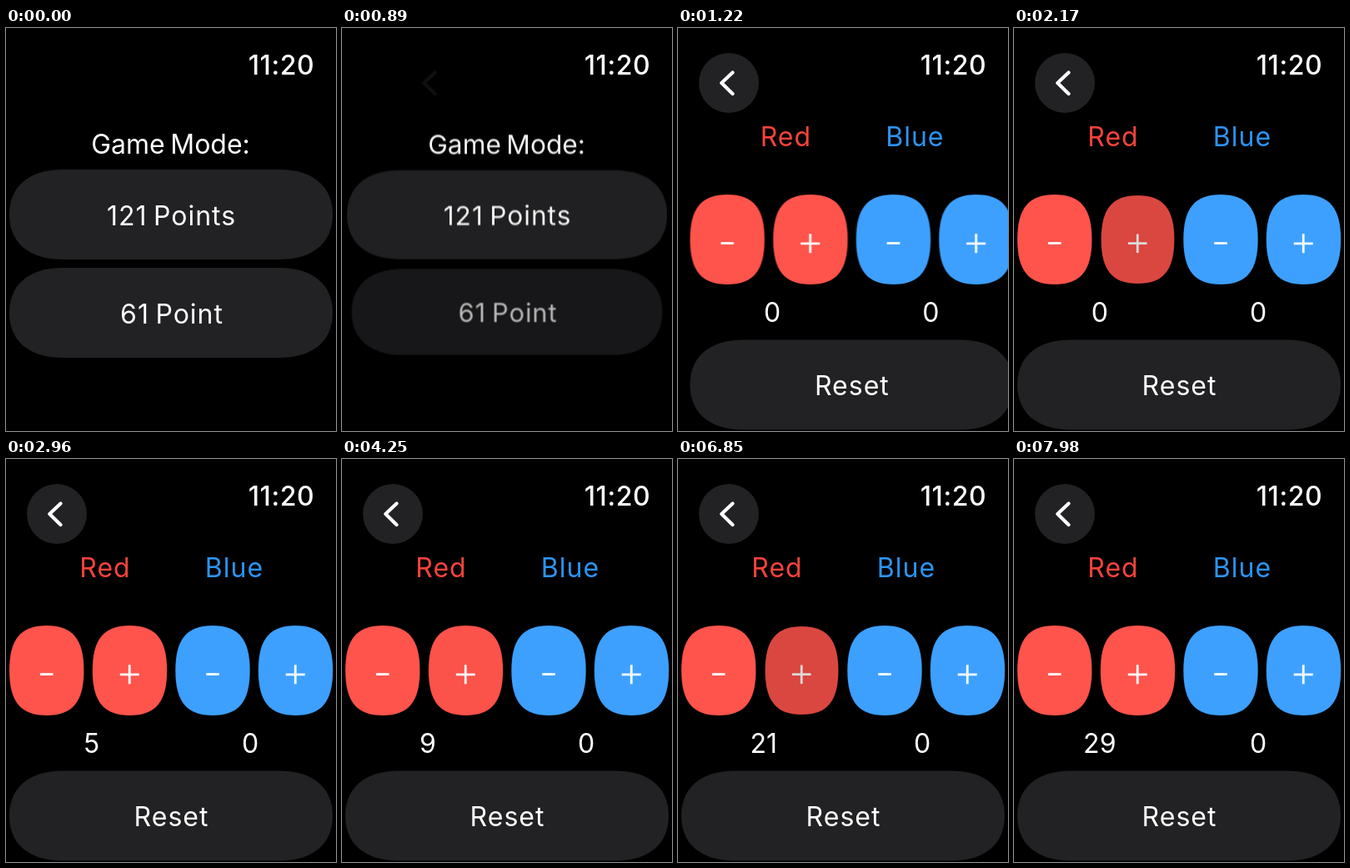
Animation, 396 px wide and 484 px high, one loop 8000 ms. Source, as an HTML page:

```html
<!DOCTYPE html>
<html lang="en">
<head>
<meta charset="utf-8">
<title>Score keeper</title>
<style>
  html, body { margin: 0; width: 100%; height: 100%; overflow: hidden; background: #000; }
  svg { display: block; width: 396px; height: 484px; }
  text {
    font: 400 32px Inter, "Noto Sans", sans-serif;
    fill: #fff;
    text-anchor: middle;
    letter-spacing: 1px;
    word-spacing: -2.5px;
  }
  .tight { letter-spacing: 0; }
  .clock { font-weight: 500; letter-spacing: .6px; }
  .gray { fill: #222224; }
  .red { fill: #ff544c; }
  .blue { fill: #3da0ff; }
  .pad { stroke: #000; stroke-opacity: .12; }
  .sign { fill: none; stroke: #fff; stroke-width: 2.8; }
  .chevron { fill: none; stroke: #fff; stroke-width: 4.2; stroke-linecap: round; stroke-linejoin: round; }

  #menu, #game, #disc, #arrow, #choice { animation: 8s step-end infinite; }
  #menu { transform-origin: 198px 242px; animation-name: menu; }
  #choice { transform-origin: 198px 342px; animation-name: choice; }
  #game { animation-name: game; }
  #disc { animation-name: disc; }
  #arrow { animation-name: arrow; }
  #plus { transform-box: fill-box; transform-origin: center; }

  @keyframes choice {
    0% { transform: none; opacity: 1; }
    6.25% { transform: scale(.985); opacity: .88; }
    7.75%, 100% { transform: scale(.971); opacity: .76; }
  }
  @keyframes menu {
    0% { transform: none; opacity: 1; }
    9.75% { transform: scale(.997); opacity: .99; }
    11.125% { transform: scale(.99); opacity: .96; }
    12.5% { transform: scale(.95); opacity: .45; }
    13.875% { transform: scale(.92); opacity: .1; }
    15.25%, 100% { transform: scale(.9); opacity: 0; }
  }
  @keyframes game {
    0% { transform: translateX(400px); }
    12.5% { transform: translateX(220px); }
    13.875% { transform: translateX(60px); }
    15.25% { transform: translateX(10.4px); }
    17.125%, 100% { transform: none; }
  }
  @keyframes disc {
    0% { opacity: 0; }
    12.5% { opacity: .45; }
    13.875% { opacity: .85; }
    15.25%, 100% { opacity: 1; }
  }
  @keyframes arrow {
    0% { transform: translateX(50px); opacity: 0; }
    11.125% { transform: translateX(46px); opacity: .06; }
    12.5% { transform: translateX(25px); opacity: .45; }
    13.875% { transform: translateX(8px); opacity: .85; }
    15.25%, 100% { transform: none; opacity: 1; }
  }
</style>
</head>
<body>
<svg viewBox="0 0 396 484">
  <defs>
    <path id="bar" d="M0 54C0 23 20 0 65 0H323C368 0 388 23 388 54S368 108 323 108H65C20 108 0 85 0 54Z"/>
    <path id="pad" d="M0 54C0 16.5 13.5 0 44.75 0S89.5 16.5 89.5 54S76 108 44.75 108S0 91.5 0 54Z"/>
    <path id="minusSign" d="M37 58.5h15.5"/>
    <path id="plusSign" d="M33 58.8h23M44.5 47.3v23"/>
  </defs>

  <g id="menu">
    <text class="tight" x="197.5" y="150.5">Game Mode:</text>
    <use href="#bar" class="gray" x="4" y="170"/>
    <text x="198.5" y="236.5">121 Points</text>
    <g id="choice">
      <use href="#bar" class="gray" x="4" y="288"/>
      <text x="199" y="354.5">61 Point</text>
    </g>
  </g>

  <g id="game">
    <text x="119" y="141.5" style="fill:#f6433a">Red</text>
    <text x="274" y="141.5" style="fill:#2c94f4">Blue</text>
    <g transform="translate(4 200)">
      <use href="#pad" class="pad red"/>
      <use href="#minusSign" class="sign"/>
    </g>
    <g transform="translate(103.75 200)">
      <g id="plus">
        <use href="#pad" class="pad red"/>
        <use href="#plusSign" class="sign"/>
      </g>
    </g>
    <g transform="translate(203.25 200)">
      <use href="#pad" class="pad blue"/>
      <use href="#minusSign" class="sign"/>
    </g>
    <g transform="translate(302.75 200)">
      <use href="#pad" class="pad blue"/>
      <use href="#plusSign" class="sign"/>
    </g>
    <text id="score" class="tight" x="102.8" y="352.5">0</text>
    <text class="tight" x="293" y="352.5">0</text>
    <use href="#bar" class="gray" x="4" y="374.5"/>
    <text x="198.5" y="440.5">Reset</text>
  </g>

  <circle id="disc" class="gray" cx="61" cy="66" r="36"/>
  <path id="arrow" class="chevron" d="M65.5 53.5L52.3 66L65.5 79"/>
  <text class="clock" x="330.5" y="55.5">11:20</text>
</svg>

<script>
  const LOOP = 8000;
  // Runs of quick taps: start, end, steps, score reached
  const runs = [
    [2170, 2960, 8, 5],
    [3260, 3700, 5, 7],
    [3950, 4350, 5, 9],
    [4540, 4940, 5, 11],
    [5080, 5880, 9, 16],
    [5980, 6750, 8, 21],
    [6850, 7560, 8, 26],
    [7680, 7980, 4, 29]
  ];
  const score = document.getElementById("score");
  const plus = document.getElementById("plus");

  function stateAt(t) {
    let count = 0;
    for (const [start, end, steps, goal] of runs) {
      if (t < start) break;
      const last = steps - 1;
      const k = Math.min(last, Math.floor((t - start) / (end - start) * last + 0.01));
      if (k < last) {
        const taps = i => Math.floor((goal - count) * (i + 1) / last);
        const press = taps(k) > taps(k - 1) ? 0.06 : 0.6;
        return { count: count + taps(k), press };
      }
      count = goal;
    }
    return { count, press: 0 };
  }

  let origin;
  function draw(now) {
    origin ??= now;
    const { count, press } = stateAt((now - origin) % LOOP);
    score.textContent = count;
    plus.style.opacity = 1 - 0.24 * press;
    plus.style.transform = `scale(${1 - 0.03 * press})`;
    requestAnimationFrame(draw);
  }
  requestAnimationFrame(draw);
</script>
</body>
</html>
```
